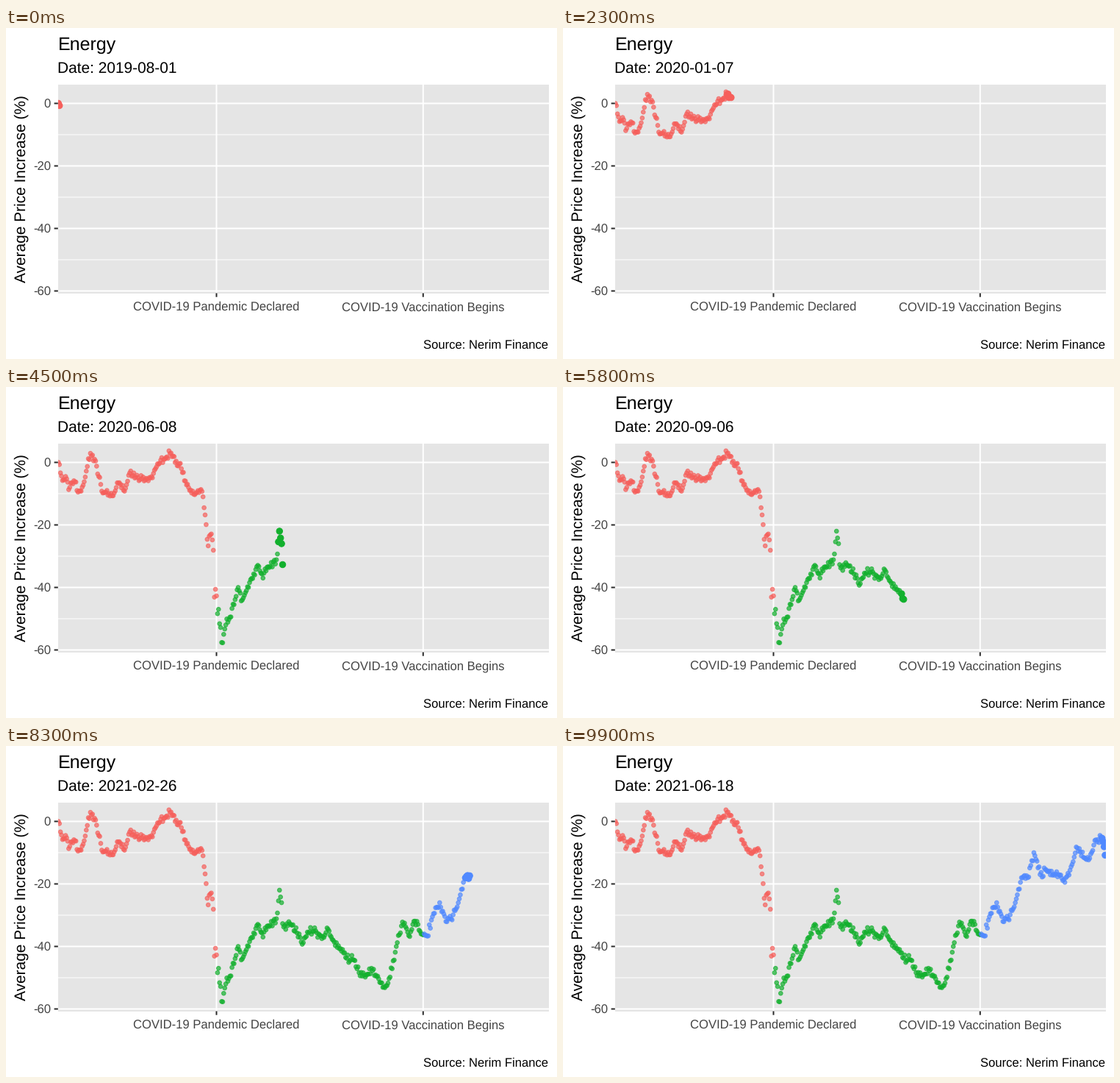
These frames come from a looping animation (750x450 px, 10 s). A matplotlib script:

```python
import matplotlib.pyplot as plt
import numpy as np
from matplotlib.animation import FuncAnimation
from matplotlib.colors import to_rgba
from matplotlib.patches import Rectangle

W, H, DPI = 750, 450, 100
FRAMES, INTERVAL = 100, 100
LEFT, RIGHT, TOP, BOTTOM = 70.8, 739, 77, 360.5
RED, GREEN, BLUE = "#f65f5b", "#12b02d", "#5089ff"
EVENTS = {153: "COVID-19 Pandemic Declared", 353: "COVID-19 Vaccination Begins"}

plt.rcParams.update({
    "font.family": "Liberation Sans",
    "text.hinting": "none",
    "toolbar": "None",
})

# Trading days, with market holidays as offsets from the start
START, SPAN = np.datetime64("2019-08-01"), 687
HOLIDAYS = [32, 119, 146, 153, 172, 200, 253, 298, 337, 403, 483, 512, 519,
            536, 564, 610, 669]
days = np.arange(SPAN + 1)
days = days[np.is_busday(START + days, holidays=START + np.array(HOLIDAYS))]
index = np.arange(len(days))
shown_at = np.rint(days / SPAN * (FRAMES - 1)).astype(int)

# Price change in percent: (first day, step, values)
CURVE = [
    (0, 1, [0]),
    (1, 3, [-.7, -5.8, -4.5, -8.7, -6.5, -6.2, -9.5, -9.2, -6.2, -1.3, 2.9, .5,
            -1.2, -4.8, -9.8, -9.5]),
    (49, 5, [-10, -9.8, -6.5, -9.2, -3.4, -5, -5.5, -5.6, -5, -2, .7, 1.5, 3,
             .4, -2, -7.2, -9.8, -9.6, -9.3]),
    (140, 1, [-11, -14.5, -16.8, -19.9, -24.6, -26.7, -23.6, -23.2, -22.9,
              -24.8, -28.1, -43.1, -40.6, -42.7, -48.4, -47, -51.6, -52.8,
              -57.6, -57.7, -55]),
    (162, 4, [-52, -49.5, -45.5, -40, -44, -41, -37.5, -36, -33.3, -37, -33.5,
              -32, -32.5]),
    (212, 2, [-29.3, -22, -26]),
    (217, 2, [-32.7]),
    (219, 6, [-33.3, -33, -35.7, -38.8, -35.3, -35, -37.5, -34.5, -38.6, -40.7,
              -43.8, -44.2, -48.4, -49.8, -47, -49.5, -53, -49.8, -40, -32.2,
              -36.5, -31.9, -36, -36.7, -29.5, -26, -32, -31.5, -26, -18, -18,
              -10, -17, -15.5, -17.2, -17, -19.5, -14.5, -8.5, -11.5, -11.8,
              -5.9, -5.4]),
    (473, 1, [-8.1, -10.8]),
]
knots = np.concatenate([a + step * np.arange(len(v)) for a, step, v in CURVE])
levels = np.concatenate([v for _, _, v in CURVE])
wobble = np.random.default_rng(8).normal(0, .7, len(index)).clip(-1.3, 1.3)
wobble[knots] = 0
change = np.interp(index, knots, levels) + wobble


def px(i):
    return 71.3 + 1.4065 * i


def py(v):
    return 102.5 - 4.25 * v


points = np.column_stack([px(index), py(change)])
first, second = EVENTS
palette = np.array([to_rgba(c) for c in (RED, GREEN, BLUE)])
colors = palette[(index > first).astype(int) + (index > second)]
faded = colors.copy()
faded[:, 3] = .7

fig = plt.figure(figsize=(W / DPI, H / DPI), dpi=DPI, facecolor="white")
ax = fig.add_axes([0, 0, 1, 1])
ax.set(xlim=(0, W), ylim=(H, 0))
ax.axis("off")


def pt(pixels):
    return pixels * 72 / DPI


def line(xs, ys, color="white", width=2):
    ax.plot(xs, ys, color=color, lw=pt(width), solid_capstyle="butt",
            snap=False, zorder=2)


def tick(xs, ys):
    line(xs, ys, "#2b2b2b")


def label(x, y, text, size=12, color="black", ha="left", **kw):
    return ax.text(x, y, text, fontsize=size, color=color, ha=ha,
                   va="baseline", zorder=6, **kw)


def dots(diameter, z):
    coll = ax.scatter([], [], s=pt(diameter) ** 2, linewidths=pt(1), zorder=z)
    coll.set_clip_path(panel)
    return coll


panel = Rectangle((LEFT, TOP), RIGHT - LEFT, BOTTOM - TOP, fc="#e5e5e5",
                  ec="none", zorder=1)
ax.add_patch(panel)

for v in range(-50, 0, 20):
    line([LEFT, RIGHT], [py(v)] * 2, width=1)
for v in range(-60, 1, 20):
    line([LEFT, RIGHT], [py(v)] * 2)
    tick([LEFT - 5.2, LEFT], [py(v)] * 2)
    label(61, py(v) + 6, str(v), color="#444444", ha="right")
for i, name in EVENTS.items():
    line([px(i)] * 2, [TOP, BOTTOM])
    tick([px(i)] * 2, [BOTTOM, BOTTOM + 5.2])
    label(px(i), 384, name, color="#444444", ha="center")

label(70.5, 30, "Energy", 18)
subtitle = label(70.5, 61, "", 15)
label(27, 219, "Average Price Increase (%)", 15, ha="center", rotation=90,
      rotation_mode="anchor")
label(738.5, 436, "Source: Nerim Finance", ha="right")

trail = dots(5.6, 3)
head = dots(8.4, 4)


def show(coll, mask, rgba):
    coll.set_offsets(points[mask])
    coll.set_facecolor(rgba[mask])
    coll.set_edgecolor(rgba[mask])


def update(k):
    subtitle.set_text(f"Date: {START + k * SPAN // (FRAMES - 1)}")
    show(trail, shown_at < k, faded)
    show(head, shown_at == k, colors)
    return subtitle, trail, head


anim = FuncAnimation(fig, update, frames=FRAMES, interval=INTERVAL,
                     repeat=True, repeat_delay=0, blit=False)
plt.show()
```
